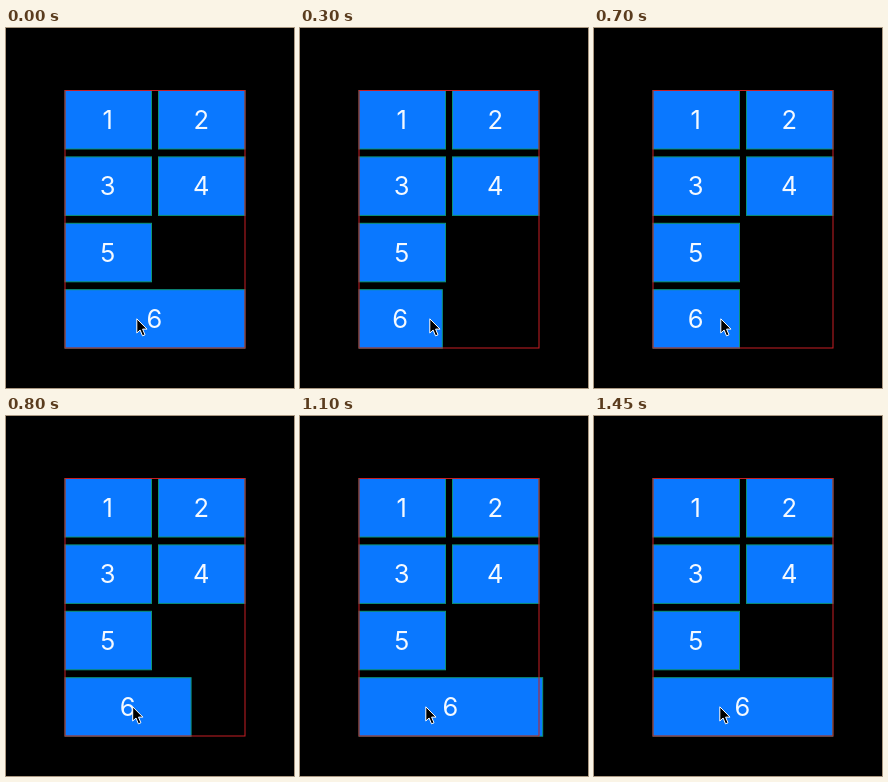
An HTML page that plays this animation: 288x360 px, repeating every 1500 ms.

```html
<!DOCTYPE html>
<html lang="en">
<head>
<meta charset="utf-8">
<title>Grid button spring</title>
<style>
  html, body { margin: 0; width: 100%; height: 100%; overflow: hidden; background: #000; }
  svg { display: block; width: 288px; height: 360px; }
  .cell { fill: #0a78ff; stroke: #0c9478; stroke-width: 1; }
  .frame { fill: none; stroke: #c81e24; stroke-width: 1; }
  text { font: 400 25.5px Inter, Roboto, sans-serif; fill: #f4f9ff; text-anchor: middle; }
  #cursor path { fill: #000; stroke: #fff; stroke-width: 1; stroke-linejoin: round; }
</style>
</head>
<body>
<svg viewBox="0 0 288 360">
  <rect width="288" height="360" fill="#000"/>
  <g id="cells"></g>
  <rect class="frame" x="59" y="62.5" width="180" height="257.5"/>
  <g id="labels"></g>
  <g id="cursor"><path d="M0 0V14.2L3.3 11.2L5.7 17L8.2 16L5.8 10.3H10.2Z"/></g>
</svg>
<script>
const LOOP = 1500, STEP = 50, GROW_AT = 700;
const LEFT = 59, TOP = 62.5, ROW = 66.4, COL = 93.5;
const NARROW = 86.5, WIDE = 180, HEIGHT = 58.5;

const $ = id => document.getElementById(id);

function add(parent, tag, attrs) {
  const el = document.createElementNS('http://www.w3.org/2000/svg', tag);
  for (const key in attrs) el.setAttribute(key, attrs[key]);
  return $(parent).appendChild(el);
}

function addCell(n, col, row) {
  const x = LEFT + col * COL, y = TOP + row * ROW;
  const box = add('cells', 'rect', { class: 'cell', x, y, width: NARROW, height: HEIGHT });
  const label = add('labels', 'text', { x: x + NARROW / 2 - 0.5, y: y + 38.5 });
  label.textContent = n;
  return { box, label };
}

for (let n = 1; n <= 5; n++) addCell(n, (n - 1) % 2, (n - 1) >> 1);
const last = addCell(6, 0, 3);

// Distance left to travel for an underdamped spring, from 1 to 0.
function spring(ms, response = 0.5, damping = 0.7) {
  const t = ms / 1000, w = 2 * Math.PI / response;
  const decay = damping * w, wd = w * Math.sqrt(1 - damping * damping);
  return Math.exp(-decay * t) * (Math.cos(wd * t) + decay / wd * Math.sin(wd * t));
}

const path = [[0, 130.8], [100, 130.6], [300, 129.8], [700, 126.8], [900, 126.6], [1100, 125.8], [LOOP, 125.8]];

function cursorX(t) {
  const i = path.findIndex(p => p[0] > t);
  const [t0, x0] = path[i - 1], [t1, x1] = path[i];
  return x0 + (x1 - x0) * (t - t0) / (t1 - t0);
}

function draw(now) {
  const t = Math.floor(now % LOOP / STEP) * STEP;
  const left = t < GROW_AT ? spring(t) : 1 - spring(t - GROW_AT);
  const width = NARROW + (WIDE - NARROW) * left;
  last.box.setAttribute('width', width);
  last.label.setAttribute('x', LEFT + width / 2 - 0.5);
  $('cursor').setAttribute('transform', `translate(${cursorX(t)} 290.8)`);
}

let start;
function tick(now) {
  start ??= now;
  draw(now - start);
  requestAnimationFrame(tick);
}
draw(0);
requestAnimationFrame(tick);
</script>
</body>
</html>
```
